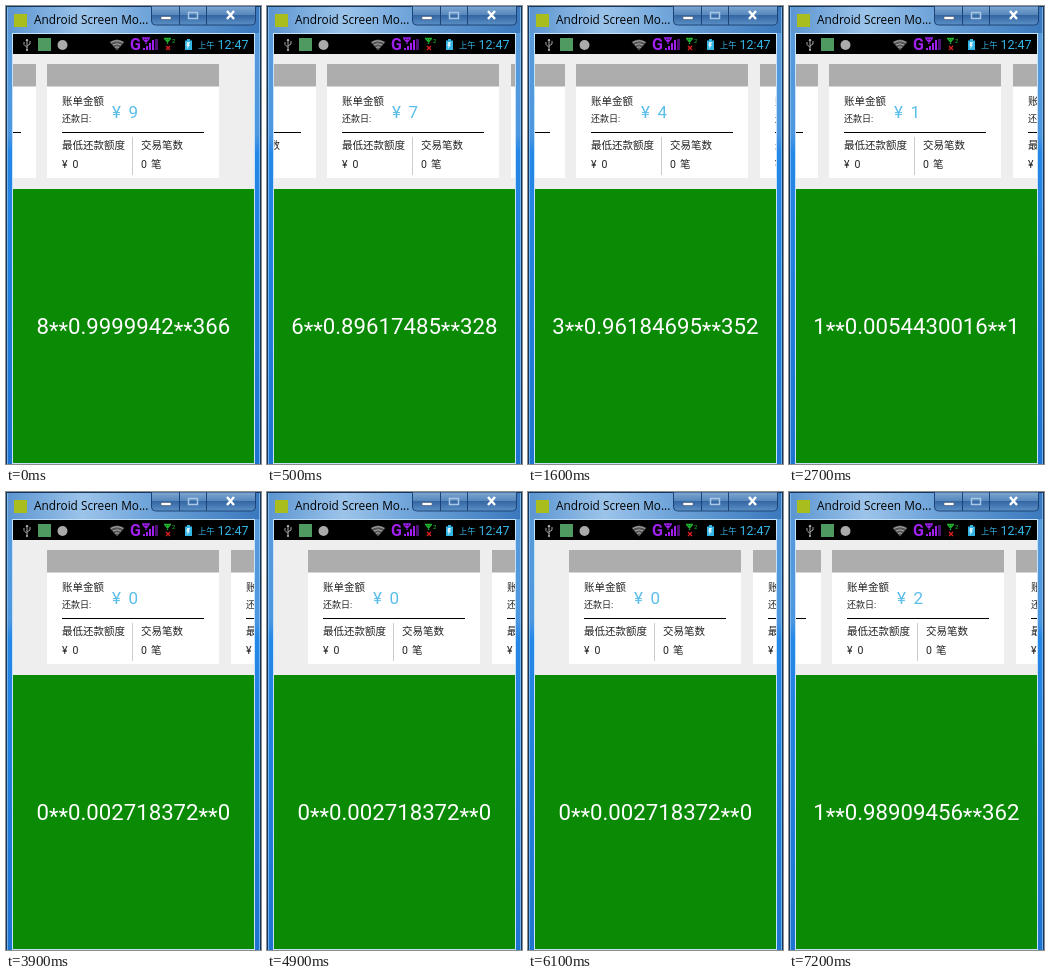
These frames come from a looping animation (255x458 px, 8000 ms). An HTML page:

```html
<!DOCTYPE html>
<html lang="zh">
<head>
<meta charset="utf-8">
<style>
html, body { margin: 0; height: 100%; overflow: hidden; }
svg { display: block; width: 255px; height: 458px; font-family: Roboto, "Noto Sans CJK SC", "Noto Sans CJK", sans-serif; }
</style>
</head>
<body>
<svg viewBox="0 0 255 458">
  <defs>
    <linearGradient id="bar">
      <stop offset="0" stop-color="#5a94d0"/><stop offset=".3" stop-color="#9cc4ea"/>
      <stop offset=".55" stop-color="#70a5da"/><stop offset="1" stop-color="#3a78bd"/>
    </linearGradient>
    <linearGradient id="side" x2="0" y2="1">
      <stop offset="0" stop-color="#5c9bd8"/><stop offset=".28" stop-color="#4d97e0"/>
      <stop offset=".32" stop-color="#2587e6"/><stop offset="1" stop-color="#1f74d0"/>
    </linearGradient>
    <linearGradient id="button" x2="0" y2="1">
      <stop offset="0" stop-color="#7fa9d4"/><stop offset=".5" stop-color="#5484ba"/>
      <stop offset=".5" stop-color="#3567a3"/><stop offset="1" stop-color="#5b90c6"/>
    </linearGradient>
    <clipPath id="screen"><rect x="7" y="48" width="241" height="135"/></clipPath>
  </defs>

  <!-- window frame -->
  <rect width="255" height="458" fill="url(#side)"/>
  <rect width="255" height="27" fill="url(#bar)"/>
  <path d="M0 .5H255M.5 0V458M254.5 0V458" stroke="#14355e"/>
  <path d="M1.5 1V458M253.5 1V458" stroke="#8fc9f6" opacity=".7"/>
  <rect x="6.500" y="27.500" width="242" height="430" fill="none" stroke="#c4e2fa"/>
  <rect x="8" y="8" width="13" height="13" fill="#a9bd1c"/>
  <text x="28" y="18" font-size="11.8" font-family="'Open Sans', sans-serif">Android Screen Mo...</text>
  <path d="M145.500 0V15q0 4 4 4H245.500q4 0 4-4V0z" fill="url(#button)" stroke="#1d4477"/>
  <path d="M173.500 0V19M200.500 0V19" stroke="#1d4477"/>
  <path d="M155 10.500h10v3h-10z" fill="#fff" stroke="#45566e" stroke-width=".6"/>
  <rect x="182.500" y="6.500" width="9" height="6" fill="none" stroke="#a9c8e8" stroke-width="1.500"/>
  <path d="M221 5l7 8M228 5l-7 8" stroke="#fff" stroke-width="2.400"/>

  <!-- status bar -->
  <rect x="7" y="28" width="241" height="20"/>
  <g fill="none" stroke="#aaa">
    <path d="M21 33.500V44M18 36v2.500l3 3M24 35v3l-3 2"/>
    <path d="M20 34.500L21 33l1 1.500z" fill="#aaa"/>
    <circle cx="21" cy="44" r=".7" fill="#aaa"/>
  </g>
  <rect x="32" y="32" width="13" height="13" fill="#4f9a60"/>
  <circle cx="56.500" cy="39" r="5" fill="#aaa"/>
  <path d="M103.500 36q7.500-5 15 0L111 44.500z" fill="#555"/>
  <path d="M105 36.500q6-3.500 12 0M107 39q4-2.500 8 0M109 41.500q2-1.500 4 0" fill="none" stroke="#aaa"/>
  <g fill="#a020f0">
    <text x="124" y="44" font-size="16" font-weight="700">G</text>
    <path d="M137 42h2v2h-2zM140 40h2v4h-2zM143 37h2v7h-2zM146 34h2v10h-2z"/>
    <path d="M136 32h8M140 32v6M137 33l3 3 3-3" fill="none" stroke="#a020f0" stroke-width="1.300"/>
    <rect x="149" y="33" width="3" height="11" opacity=".5"/>
  </g>
  <path d="M158 32.500h7M161.500 32v6M159 33l2.500 3 2.500-3" fill="none" stroke="#20b030" stroke-width="1.300"/>
  <text x="166" y="37" font-size="6" fill="#20c030">2</text>
  <path d="M160 40l4 4M164 40l-4 4" stroke="#e02020" stroke-width="1.300"/>
  <path d="M181 33h3v1.500h2V44h-7v-9.500h2z" fill="#33b5e5"/>
  <path d="M181 36h3l-1 3h1l-3 4 .5-3h-1z" fill="#d8f2ff"/>
  <g fill="#33b5e5">
    <text x="192" y="42" font-size="8.300">上午</text>
    <text x="211.500" y="42.500" font-size="12.500">12:47</text>
  </g>

  <!-- app -->
  <rect x="7" y="48" width="241" height="135" fill="#eee"/>
  <g id="pager" clip-path="url(#screen)"></g>
  <rect x="7" y="183" width="241" height="274" fill="#0a8a05"/>
  <text id="label" x="127.300" y="328" font-size="22.200" fill="#fff" text-anchor="middle"></text>
</svg>
<script>
const PITCH = 183.75, LEFT = 41.4, COUNT = 10, LOOP = 8000;
// start time, page, page offset, offset in pixels
const states = [
  [0, 8, '0.9999942', 366],
  [500, 6, '0.89617485', 328],
  [1600, 3, '0.96184695', 352],
  [2700, 1, '0.0054430016', 1],
  [3900, 0, '0.002718372', 0],
  [7200, 1, '0.98909456', 362]
];
const pager = document.getElementById('pager');
const label = document.getElementById('label');

const text = (x, y, size, s, fill = '#222') =>
  `<text x="${x}" y="${y}" font-size="${size}" fill="${fill}">${s}</text>`;

const card = i => `<g>
  <rect y="58" width="172" height="114" fill="#fff"/>
  <rect y="58" width="172" height="22.500" fill="#adadad"/>
  <path d="M15 126.500H157" stroke="#000"/>
  <path d="M85.500 131V169" stroke="#ccc"/>` +
  text(15, 99, 10.5, '账单金额') + text(15, 116, 9, '还款日:') +
  text(65, 112, 17, '¥', '#5bbdea') + text(81.5, 112, 17, i, '#5bbdea') +
  text(15, 143, 10.5, '最低还款额度') + text(94, 143, 10.5, '交易笔数') +
  text(15, 161.5, 10.5, '¥') + text(25.5, 161.5, 10.5, 0) +
  text(94, 161.5, 10.5, 0) + text(104, 161.5, 10.5, '笔') + '</g>';

pager.innerHTML = Array.from({ length: COUNT }, (_, i) => card(i)).join('');

// the stars sit at the middle of the digits
const stars = '<tspan dy="4">**</tspan><tspan dy="-4">';

function draw(now) {
  const t = now % LOOP;
  const [, page, offset, pixels] = states.findLast(s => s[0] <= t);
  [...pager.children].forEach((el, i) => {
    const x = Math.round(LEFT + (i - page - offset) * PITCH);
    el.setAttribute('transform', `translate(${x})`);
  });
  label.innerHTML = `${page}${stars}${offset}</tspan>${stars}${pixels}</tspan>`;
  requestAnimationFrame(draw);
}
draw(0);
</script>
</body>
</html>
```
